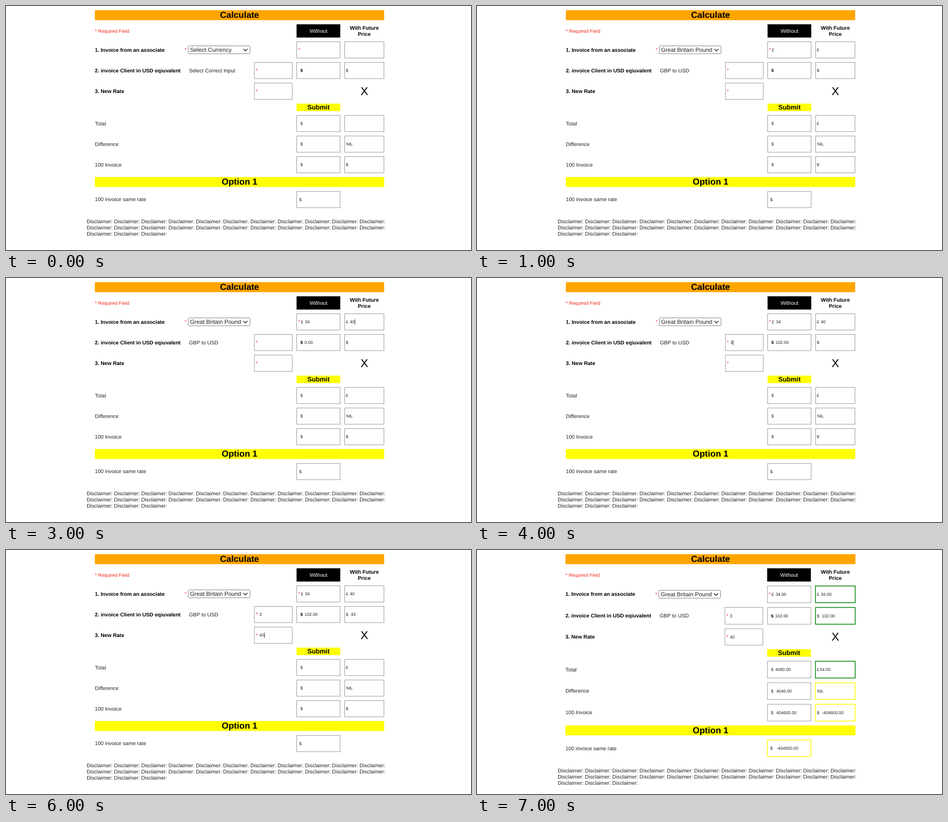
Animation of 900 by 474 pixels, one loop 8000 ms. Source, as an HTML page:

```html
<!DOCTYPE html>
<html lang="en">
<head>
<meta charset="utf-8">
<title>Invoice calculator</title>
<style>
  html, body { margin: 0; width: 100%; height: 100%; overflow: hidden; background: #fff; }
  svg { display: block; width: 900px; height: 474px; font-family: "Liberation Sans", Arial, sans-serif; text-rendering: geometricPrecision; white-space: pre; }
</style>
</head>
<body>
<svg id="stage" viewBox="0 0 900 474"></svg>
<script>
const LOOP = 8000, STEP = 1000;
const BODY = 10.15, SMALL = 8.3;
const INK = '#222', RED = '#f0281e', GREY = '#999', GREEN = '#008000', YELLOW = '#ff0';

const text = (x, mid, str, { size = BODY, bold = false, fill = bold ? '#000' : INK, center = false } = {}) =>
  `<text x="${x}" y="${mid + size * 0.33}" font-size="${size}" fill="${fill}"` +
  `${bold ? ' font-weight="700"' : ''}${center ? ' text-anchor="middle"' : ''}>${str}</text>`;
const bar = (x, y, w, h, fill) => `<rect x="${x}" y="${y}" width="${w}" height="${h}" fill="${fill}"/>`;
const box = (x, y, w, h, stroke = GREY, weight = 1, rx = 0) =>
  `<rect x="${x}" y="${y}" width="${w}" height="${h}" rx="${rx}" fill="none" stroke="${stroke}" stroke-width="${weight}"/>`;
const small = (x, mid, str, options) => text(x, mid, str, { size: SMALL, ...options });
const star = (x, mid) => text(x, mid, '*', { size: 9.5, fill: RED });

function entry(x, mid, str, caret) {
  const end = x + str.length * 0.556 * SMALL + 0.4;
  return small(x, mid, str) + (caret ? bar(end, mid - 5, 0.8, 10, '#000') : '');
}

function draw(step) {
  const done = step === 7;
  const from = (first, str) => step >= first ? str : '';
  const result = str => done ? str : '';
  const dx = done ? -0.8 : 0;
  const cellH = done ? 32.6 : 31.5;
  const rows = done ? [86.1, 127.9, 168.9, 232.4, 274.1, 315.9, 385.2]
                    : [85.3, 125.3, 165.6, 228.3, 268.3, 308.3, 376];
  const [invoice, client, rate, total, diff, hundred, same] = rows;
  const submitY = done ? 192.7 : 189.6, optionY = done ? 340.9 : 332.3;
  const noteY = done ? 428.7 : 418.7;
  const left = 172 + dx, barLeft = done ? 171.3 : 172, barW = done ? 561.2 : 560;
  const pound = from(1, '£');

  const cell = (x, w, mid, stroke, h = cellH) =>
    box(x, mid - h / 2, w, h, stroke, stroke ? 1.45 : 1);
  const without = (mid, stroke) => cell(562.6 + dx / 2, 84.1, mid, stroke);
  const future = (mid, stroke) =>
    done ? cell(655.1, 76.8, mid, stroke) : cell(655.5, 76, mid);
  const input = (mid, h) => cell(480.8 + dx, 73.3, mid, undefined, h) + star(483.5 + dx, mid);

  let out = bar(barLeft, 8.2, barW, 19.3, '#ffa500')
    + text(452, 17.6, 'Calculate', { size: 17, bold: true, center: true })
    + text(left, 48.5, '* Required Field', { size: 9.3, fill: RED })
    + bar(562.4 + dx, 35.5, 84.6, 25.8, '#000')
    + text(604.8 + dx, 48.3, 'Without', { fill: '#fff', center: true })
    + text(693.5, 42.8, 'With Future', { bold: true, center: true })
    + text(693.5, 54.8, 'Price', { bold: true, center: true });

  // Currency row
  const chevronX = 459.5 + dx, chevronY = invoice - 1.8;
  out += text(left, invoice, '1. Invoice from an associate', { bold: true })
    + star(345.7 + dx, invoice)
    + box(352.7 + dx, invoice - 7.8, 119.6, 15.3, '#767676', 0.9, 2)
    + text(356.2 + dx, invoice, step ? 'Great Britain Pound' : 'Select Currency', { size: 11.3 })
    + `<path d="M${chevronX} ${chevronY}l3.9 3.8 3.9-3.8" fill="none" stroke="${INK}" stroke-width="1.5"/>`
    + without(invoice) + star(565.5 + dx, invoice)
    + small(570.8 + dx, invoice, pound)
    + entry(578.7 + dx, invoice, done ? '34.00' : from(2, '34'), step === 2)
    + future(invoice, GREEN) + small(657.7, invoice, pound)
    + entry(665.5, invoice, done ? '34.00' : from(3, '40'), step === 3);

  // Conversion and rate rows
  out += text(left, client, '2. invoice Client in USD eqiuvalent', { bold: true })
    + text(354.2 + dx, client, step ? 'GBP to USD' : 'Select Correct Input')
    + input(client) + entry(490.3 + dx, client, from(4, '3'), step === 4)
    + without(client) + small(569.7 + dx, client, '$', { bold: true })
    + small(577.8 + dx, client, from(2, step < 4 ? '0.00' : '102.00'))
    + future(client, GREEN) + small(657.7, client, '$')
    + entry(667.6, client, done ? '102.00' : from(5, '45'), step === 5)
    + text(left, rate, '3. New Rate', { bold: true })
    + input(rate, 31.8) + entry(490.3 + dx, rate, from(6, '40'), step === 6)
    + text(693.5, rate - 0.2, 'X', { size: 22, center: true, fill: '#000' })
    + bar(562.4 + dx, submitY, 84.6, 14.6, YELLOW)
    + text(604.8 + dx, submitY + 7.2, 'Submit', { size: 12.75, bold: true, center: true });

  // Results
  const resultRow = (mid, label, value, valueX) => text(left, mid, label) + without(mid)
    + small(569.7 + dx, mid, '$') + small(valueX, mid, result(value));
  out += resultRow(total, 'Total', '4080.00', 577.2)
    + future(total, GREEN) + small(657.7, total, pound) + small(663.3, total, result('34.00'))
    + resultRow(diff, 'Difference', '4046.00', 579.2)
    + future(diff, YELLOW) + small(658.2, diff, 'NIL')
    + resultRow(hundred, '100 Invoice', '404600.00', 579.2)
    + future(hundred, YELLOW) + small(657.7, hundred, '$') + small(667.6, hundred, result('-404600.00'));

  out += bar(barLeft, optionY, barW, 19.2, YELLOW)
    + text(452, optionY + 9.4, 'Option 1', { size: 17, bold: true, center: true })
    + text(left, same, '100 invoice same rate')
    + without(same, done ? YELLOW : undefined)
    + small(567.6, same, '$') + small(579.8, same, result('-404600.00'));

  [11, 11, 3].forEach((count, line) => {
    out += text(156.2, noteY + line * 11.9, 'Disclaimer: '.repeat(count).trim(), { size: 10.12 });
  });
  return out;
}

const stage = document.getElementById('stage');
const start = performance.now();
let shown = -1;

function tick() {
  const step = Math.floor(((performance.now() - start) % LOOP) / STEP);
  if (step !== shown) {
    stage.innerHTML = draw(step);
    shown = step;
  }
  requestAnimationFrame(tick);
}
tick();
</script>
</body>
</html>
```
